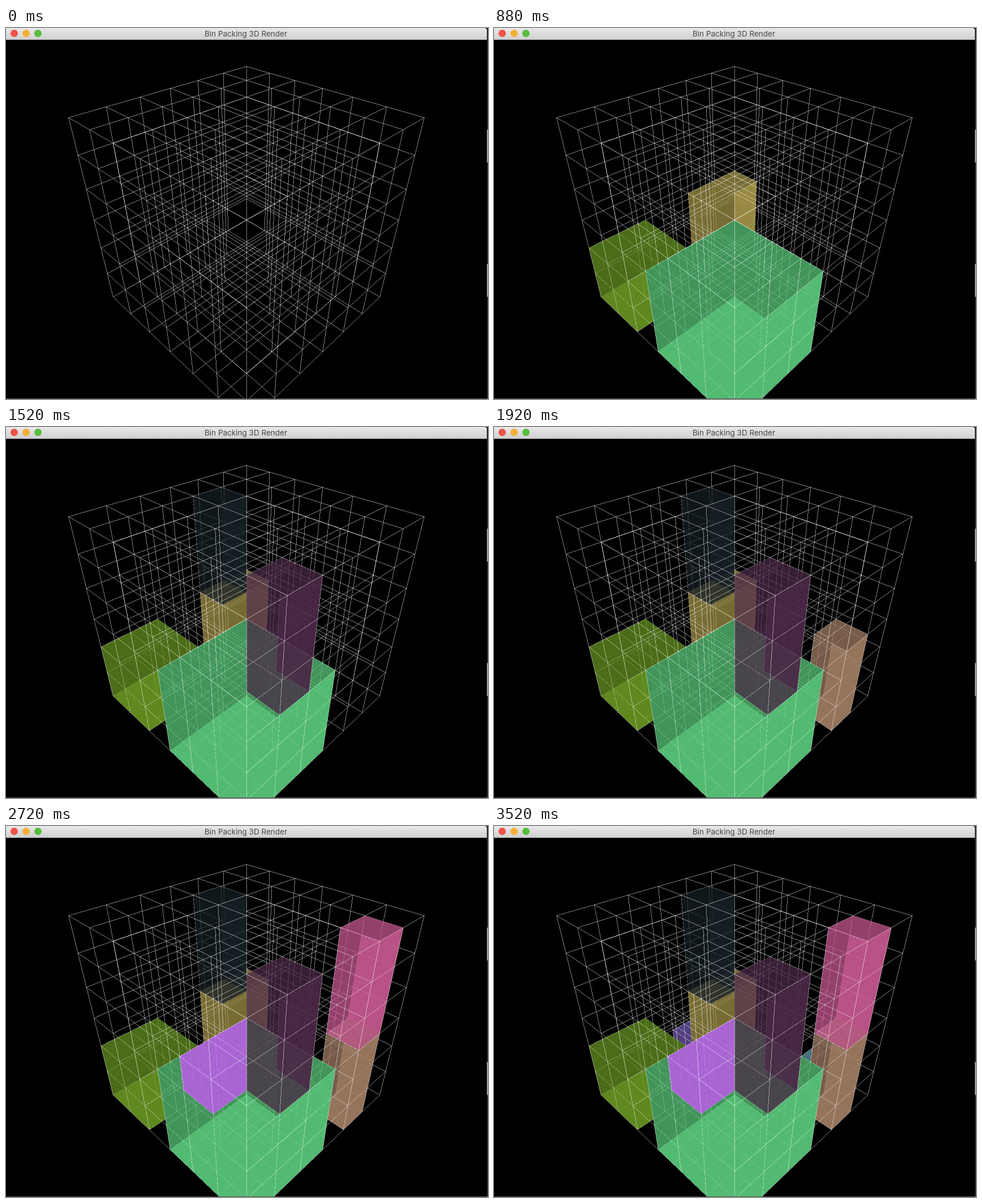
An HTML page with a canvas for the animation above (3.6 s loop, 852x657 px).

```html
<!DOCTYPE html>
<html lang="en">
<head>
<meta charset="utf-8">
<title>Bin Packing 3D Render</title>
<style>
  html, body { margin: 0; width: 852px; height: 657px; overflow: hidden; background: #000; }
  canvas, header, aside { position: absolute; top: 0; left: 0; }
  header {
    width: 850px; height: 20px; border-bottom: 1px solid #b4b4b4; border-radius: 0 4px 0 0;
    background: linear-gradient(#e8e8e8, #d0d0d0);
    font: 13.5px/20px Inter, sans-serif; color: #464646; text-align: center; text-indent: -2px;
  }
  header::before {
    content: ""; position: absolute; left: 8px; top: 3px; width: 13px; height: 13px;
    border-radius: 50%; background: #ed5149;
    box-shadow: 21px 0 #f2b034, 42px 0 #54be3c;
  }
  aside {
    left: 850px; width: 2px; height: 657px;
    background: repeating-linear-gradient(#23282b 0 180px, #a0a0a0 180px 238px);
  }
</style>
</head>
<body>
<canvas width="852" height="657"></canvas>
<aside></aside>
<header>Bin Packing 3D Render</header>
<script>
const WIDTH = 852, HEIGHT = 657, SCALE = 2;
const W = WIDTH * SCALE, H = HEIGHT * SCALE;
const CX = 425 * SCALE, CY = 340 * SCALE, FOCAL = 1088 * SCALE;
const EYE = 10, SIZE = 6, ROOT3 = Math.sqrt(3), FACE_ALPHA = 0.74;
const LOOP = 3600, TICK = 80, FIRST = 110, GAP = 350;

const cube = n => [n, n, n];
const tower = [1, 1, 3];
const box = (color, size, ...corner) => ({
  color: [1, 3, 5].map(i => parseInt(color.slice(i, i + 2), 16)),
  range: corner.map((c, axis) => [c, c + size[axis]]),
});
const boxes = [
  box('#59c87a', cube(3), 3, 3, 0),
  box('#669221', cube(2), 0, 4, 0),
  box('#a29248', [1, 2, 2], 1, 1, 1),
  box('#151f25', tower, 1, 2, 3),
  box('#4a2846', tower, 5, 4, 3),
  box('#a07d62', tower, 5, 1, 0),
  box('#c65890', tower, 5, 1, 3),
  box('#cc54fc', [1, 2, 1], 4, 4, 3),
  box('#6e55aa', cube(1), 0, 2, 0),
  box('#5f96aa', cube(1), 4, 0, 0),
];

// Scene at double resolution with a depth buffer
const image = new ImageData(W, H);
const rgba = image.data;
const depth = new Float64Array(W * H).fill(Infinity);

function blend(i, color, alpha) {
  for (let k = 0; k < 3; k++) rgba[4 * i + k] += (color[k] - rgba[4 * i + k]) * alpha;
  rgba[4 * i + 3] = 255;
}

function project([x, y, z]) {
  const w = 3 * EYE - x - y - z, s = FOCAL / w;
  return [CX + s * (x - y) * ROOT3 / 2, CY + s * ((x + y) / 2 - z), 1 / w];
}

// One-pixel line between whole-pixel end points
function drawLine(from, to) {
  const snap = ([x, y, inverse]) => [Math.round(x - 0.5), Math.round(y - 0.5), inverse];
  const a = snap(project(from)), b = snap(project(to));
  const delta = b.map((value, k) => value - a[k]);
  const steps = Math.max(Math.abs(delta[0]), Math.abs(delta[1]));
  for (let n = 0; n <= steps; n++) {
    const [x, y, inverse] = a.map((value, k) => value + delta[k] * n / steps);
    if (y > H - 1) continue;
    const i = Math.round(y) * W + Math.round(x);
    blend(i, [255, 255, 255], 1);
    depth[i] = Math.min(depth[i], 1 / inverse);
  }
}

function drawBox({ color, range }) {
  const [xs, ys, zs] = range;
  const corners = xs.flatMap(x => ys.flatMap(y => zs.map(z => project([x, y, z]))));
  const low = k => Math.floor(Math.min(...corners.map(c => c[k])));
  const high = k => Math.ceil(Math.max(...corners.map(c => c[k])));
  const [left, top, right, bottom] = [low(0), low(1), high(0), Math.min(high(1), H)];
  for (let py = top; py < bottom; py++) {
    for (let px = left; px < right; px++) {
      const u = (px + 0.5 - CX) / FOCAL / ROOT3, v = (py + 0.5 - CY) / FOCAL;
      const ray = [(v - 1) / 3 + u, (v - 1) / 3 - u, (-1 - 2 * v) / 3];
      const inside = (axis, w) => {
        const p = EYE + w * ray[axis];
        return p >= range[axis][0] && p <= range[axis][1];
      };
      const i = py * W + px;
      // Faces in order: bottom, top, back, front, right, left
      for (let axis = 2; axis >= 0; axis--) {
        for (let n = 0; n < 2; n++) {
          const side = axis ? n : 1 - n;
          const w = (range[axis][side] - EYE) / ray[axis];
          if (w < depth[i] && inside((axis + 1) % 3, w) && inside((axis + 2) % 3, w)) {
            blend(i, color, FACE_ALPHA);
            depth[i] = w;
          }
        }
      }
    }
  }
}

const buffer = new OffscreenCanvas(W, H);
function snapshot() {
  buffer.getContext('2d').putImageData(image, 0, 0);
  const stage = new OffscreenCanvas(WIDTH, HEIGHT);
  const pen = stage.getContext('2d');
  pen.fillRect(0, 0, WIDTH, HEIGHT);
  pen.drawImage(buffer, 0, 0, WIDTH, HEIGHT);
  pen.fillStyle = '#555';
  pen.fillRect(0, HEIGHT - 1, WIDTH, 1);
  return stage;
}

for (let i = 0; i <= SIZE; i++) {
  for (let j = 0; j <= SIZE; j++) {
    drawLine([0, i, j], [SIZE, i, j]);
    drawLine([i, 0, j], [i, SIZE, j]);
    drawLine([i, j, 0], [i, j, SIZE]);
  }
}
const stages = [snapshot()];
for (const item of boxes) {
  drawBox(item);
  stages.push(snapshot());
}

const ctx = document.querySelector('canvas').getContext('2d');
function render() {
  const t = Math.floor(performance.now() % LOOP / TICK) * TICK;
  const count = Math.floor((t - FIRST) / GAP) + 1;
  ctx.drawImage(stages[Math.max(0, Math.min(boxes.length, count))], 0, 0);
  requestAnimationFrame(render);
}
render();
</script>
</body>
</html>
```
